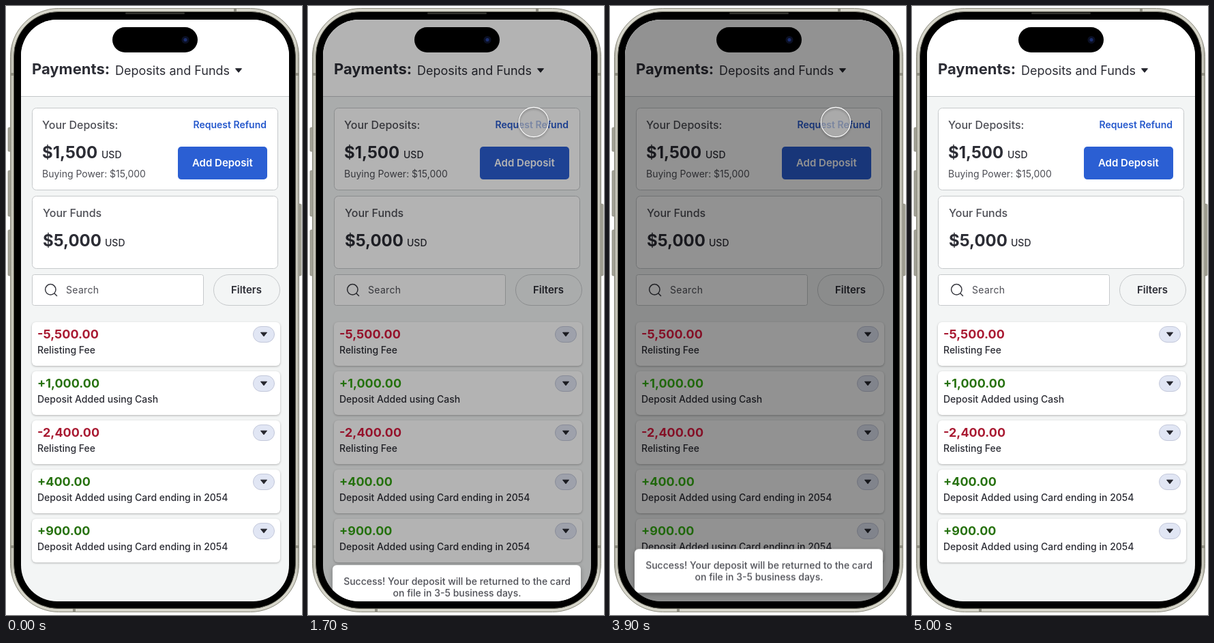
An HTML page for the animation above (5500 ms loop, 434 px wide and 892 px high).

```html
<!DOCTYPE html>
<html lang="en">
<head>
<meta charset="utf-8">
<title>Payments</title>
<style>
  html, body { margin: 0; width: 100%; height: 100%; overflow: hidden; background: #fff; }
  svg { display: block; width: 100%; height: 100%; }
  text { font-family: Inter, sans-serif; font-size: 14px; fill: #2c2d35; }
  .mid { text-anchor: middle; }
  .medium { font-weight: 500; }
  .semi { font-weight: 600; }
  .bold { font-weight: 700; }
  .soft { fill: #4d4e55; }
  .label { font-size: 16px; font-weight: 500; }
  .sum { font-size: 24px; font-weight: 700; }
  .box { fill: #fff; stroke: #c6c9cb; }
  .row rect:first-child { fill: #fff; filter: drop-shadow(0 1.5px 1.5px rgba(0, 0, 0, .27)); }
  .amount { font-size: 18px; font-weight: 700; fill: var(--ink); }
  .minus { --ink: #a91a32; --lit: #f01c46; }
  .plus { --ink: #27720f; --lit: #3cc016; }

  .amount, .shade, .toast, .tap, .halo, .disc { animation: 5.5s infinite; }
  .amount { animation-name: lit; }
  .shade { animation-name: shade; }
  .toast { animation-name: toast; filter: drop-shadow(0 2px 3px rgba(0, 0, 0, .3)); }
  .tap { animation-name: tap; }
  .halo { animation-name: halo; filter: drop-shadow(0 2px 1.5px rgba(0, 0, 0, .4)); }
  .disc { animation-name: disc; }

  /* the sheet opens at 1547 ms and closes at 3869 ms, 360 ms each */
  @keyframes shade {
    0%, 28.127% { opacity: 0; animation-timing-function: ease-out; }
    34.673%, 70.345% { opacity: .5; animation-timing-function: ease-out; }
    76.891%, 100% { opacity: 0; }
  }
  @keyframes toast {
    0%, 28.127% { transform: translateY(93px); animation-timing-function: ease-out; }
    34.673%, 70.345% { transform: none; animation-timing-function: ease-out; }
    76.891%, 100% { transform: translateY(93px); }
  }
  @keyframes lit {
    0%, 28.127% { fill: var(--ink); animation-timing-function: ease-out; }
    34.673%, 70.345% { fill: var(--lit); animation-timing-function: ease-out; }
    76.891%, 100% { fill: var(--ink); }
  }
  @keyframes disc {
    0%, 28.127% { fill: rgba(160, 160, 160, .7); animation-timing-function: ease-out; }
    34.673%, 70.345% { fill: rgba(190, 190, 190, .6); animation-timing-function: ease-out; }
    76.891%, 100% { fill: rgba(160, 160, 160, .7); }
  }
  @keyframes tap {
    0% { opacity: 0; animation-timing-function: step-end; }
    27.26%, 78.182% { opacity: 1; animation-timing-function: linear; }
    83.636%, 100% { opacity: 0; }
  }
  @keyframes halo {
    0%, 28.127% { opacity: 0; }
    30.5%, 100% { opacity: 1; }
  }
</style>
</head>
<body>
<svg viewBox="0 0 434 892" preserveAspectRatio="none">
  <defs>
    <clipPath id="screen"><rect x="22" y="20" width="393" height="852" rx="53"/></clipPath>
    <linearGradient id="metal" x2="1" y2="0">
      <stop offset="0" stop-color="#a9a89c"/>
      <stop offset=".012" stop-color="#d6d5ca"/>
      <stop offset=".988" stop-color="#d6d5ca"/>
      <stop offset="1" stop-color="#a9a89c"/>
    </linearGradient>
    <path id="caret" d="M-4.5-2.8h9L0 2.8z" fill="#24252d" stroke="#24252d" stroke-linejoin="round"/>
  </defs>

  <!-- phone body -->
  <g fill="#a5a498" stroke="#77766a" stroke-width=".6">
    <rect x="3" y="178" width="5" height="35" rx="1.5"/>
    <rect x="3" y="241" width="5" height="67" rx="1.5"/>
    <rect x="3" y="328" width="5" height="67" rx="1.5"/>
    <rect x="428" y="290" width="5" height="105" rx="1.5"/>
  </g>
  <rect x="6.5" y="3.5" width="423" height="884" rx="71" fill="url(#metal)" stroke="#8a897c"/>
  <path d="M6 100h6M6 792h6M424 100h6M424 792h6M100 882v6M336 3v6" stroke="#8f8e82" stroke-width="4"/>
  <rect x="11.5" y="8.5" width="413" height="874" rx="65" stroke="#5a594f"/>
  <rect x="175" y="9.5" width="87" height="2.5" rx="1.2" fill="#34342f"/>

  <g clip-path="url(#screen)">
    <path fill="#f3f5f5" d="M22 20h393v852H22z"/>
    <path fill="#fff" d="M22 20h393v112H22z"/>
    <path stroke="#c4c7c9" d="M22 132.5h393"/>
    <text class="bold" x="38" y="100" style="font-size:22px">Payments:</text>
    <text x="160" y="101" style="font-size:18px">Deposits and Funds</text>
    <use href="#caret" x="341" y="94.5"/>

    <rect class="box" x="38.5" y="149.5" width="360" height="120" rx="6"/>
    <text class="label soft" x="53" y="180">Your Deposits:</text>
    <text class="semi" x="382" y="179" text-anchor="end" style="fill:#2558cc">Request Refund</text>
    <text class="sum" x="53" y="223">$1,500</text>
    <text class="medium" x="140" y="223">USD</text>
    <text class="soft" x="53" y="251">Buying Power: $15,000</text>
    <rect x="252" y="206" width="131" height="48" rx="5" fill="#2b5fd3"/>
    <text class="semi mid" x="317.3" y="235" style="font-size:15px;fill:#fff">Add Deposit</text>

    <rect class="box" x="38.5" y="278.5" width="360" height="106" rx="6"/>
    <text class="label soft" x="54" y="309">Your Funds</text>
    <text class="sum" x="54" y="352">$5,000</text>
    <text class="medium" x="145" y="352">USD</text>

    <rect class="box" x="38.5" y="393.5" width="251" height="45" rx="3"/>
    <g fill="none" stroke="#3a3b42" stroke-width="1.5" stroke-linecap="round">
      <circle cx="65.3" cy="415.3" r="7.7"/>
      <path d="M71 421l3.5 3.5"/>
    </g>
    <text class="soft" x="88" y="421" style="letter-spacing:.3px">Search</text>
    <rect class="box" x="304.5" y="393.5" width="97" height="45" rx="22.5" style="fill:#f3f5f5"/>
    <text class="semi mid" x="352.5" y="421" style="font-size:15px">Filters</text>

    <g id="rows"></g>

    <path class="shade" d="M22 20h393v852H22z"/>
    <g class="toast">
      <rect x="36" y="782" width="364" height="64" rx="6" fill="#fff"/>
      <text class="medium soft mid" x="218.5" y="811">Success! Your deposit will be returned to the card</text>
      <text class="medium soft mid" x="218.5" y="828">on file in 3-5 business days.</text>
    </g>
  </g>

  <!-- camera island -->
  <rect x="156" y="31" width="125" height="37" rx="18.5"/>
  <circle cx="263" cy="49.5" r="5.5" fill="#0b1024"/>
  <circle cx="263" cy="49.5" r="2.5" fill="#1c2f70"/>

  <g class="tap">
    <circle class="disc" cx="331" cy="170" r="22"/>
    <circle class="halo" cx="331" cy="170" r="21.6" fill="none" stroke="#fff" stroke-width="1.1"/>
  </g>
</svg>
<script>
  const entries = [
    ['-5,500.00', 'Relisting Fee'],
    ['+1,000.00', 'Deposit Added using Cash'],
    ['-2,400.00', 'Relisting Fee'],
    ['+400.00', 'Deposit Added using Card ending in 2054'],
    ['+900.00', 'Deposit Added using Card ending in 2054']
  ];
  document.getElementById('rows').innerHTML = entries.map(([amount, note], i) => `
    <g class="row" transform="translate(38 ${463 + i * 72})">
      <rect width="364" height="64" rx="6"/>
      <text class="amount ${amount[0] === '-' ? 'minus' : 'plus'}" x="8" y="24">${amount}</text>
      <text class="medium" x="8" y="46">${note}</text>
      <rect x="324.5" y="6.5" width="31" height="23" rx="11.5" fill="#e1e6f4" stroke="#c3c8da"/>
      <use href="#caret" x="340" y="18"/>
    </g>`).join('');
</script>
</body>
</html>
```
